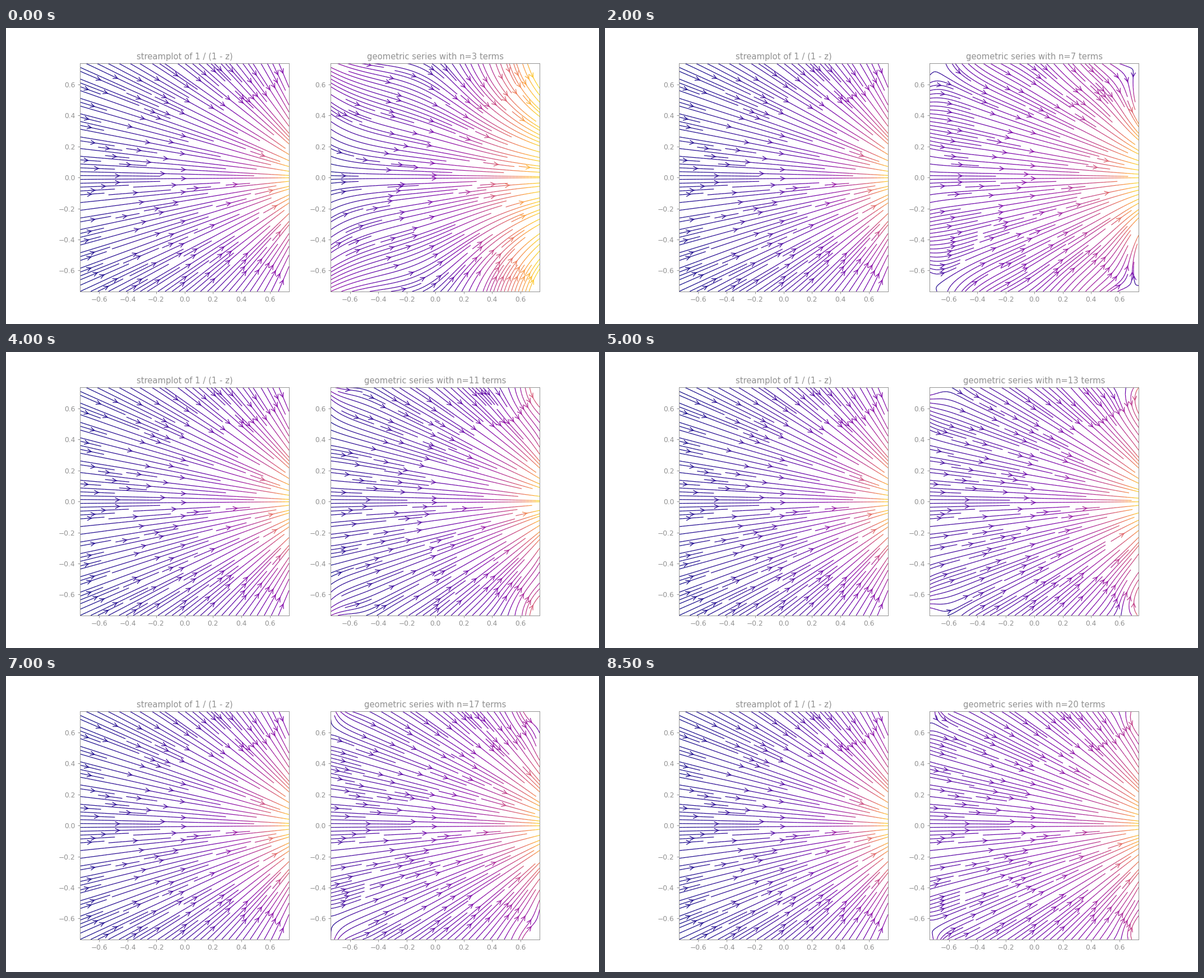
A matplotlib script that plays this animation: 1058 px wide and 529 px high, repeating every 9 s.

```python
import matplotlib.pyplot as plt
import numpy as np
from matplotlib.animation import FuncAnimation

WIDTH, HEIGHT = 1058, 529
FIRST_N, LAST_N = 3, 20
LIMIT = 0.735
GREY = "0.57"

axis = np.linspace(-LIMIT, LIMIT, 100)
x, y = np.meshgrid(axis, axis)
z = x + 1j * y


def geometric_sum(n):
    return sum(z**k for k in range(n + 1))


def style(ax):
    ax.set_xlim(-LIMIT, LIMIT)
    ax.set_ylim(-LIMIT, LIMIT)
    ticks = np.linspace(-0.6, 0.6, 7)
    ax.set_xticks(ticks)
    ax.set_yticks(ticks)
    ax.tick_params(color=GREY, labelcolor=GREY)
    for spine in ax.spines.values():
        spine.set_color(GREY)


def draw_field(ax, w):
    """Plot the conjugate field of w and return the artists it added."""
    before = set(ax.get_children())
    ax.streamplot(axis, axis, w.real, -w.imag, color=np.abs(w), cmap="plasma",
                  density=2, linewidth=1, arrowstyle="->", arrowsize=1.5)
    return [a for a in ax.get_children() if a not in before]


plt.rcParams["font.family"] = "DejaVu Sans"
fig, (left, right) = plt.subplots(1, 2, figsize=(12, 6), dpi=WIDTH / 12,
                                  facecolor="white")

draw_field(left, 1 / (1 - z))
left.set_title("streamplot of 1 / (1 - z)", color=GREY)

terms = range(FIRST_N, LAST_N + 1)
layers = [draw_field(right, geometric_sum(n)) for n in terms]

for ax in (left, right):
    style(ax)


def update(frame):
    for i, layer in enumerate(layers):
        for artist in layer:
            artist.set_visible(i == frame)
    right.set_title(f"geometric series with n={terms[frame]} terms", color=GREY)
    return []


anim = FuncAnimation(fig, update, frames=len(terms), interval=500,
                     init_func=lambda: update(0), repeat=True, repeat_delay=0)
plt.show()
```
